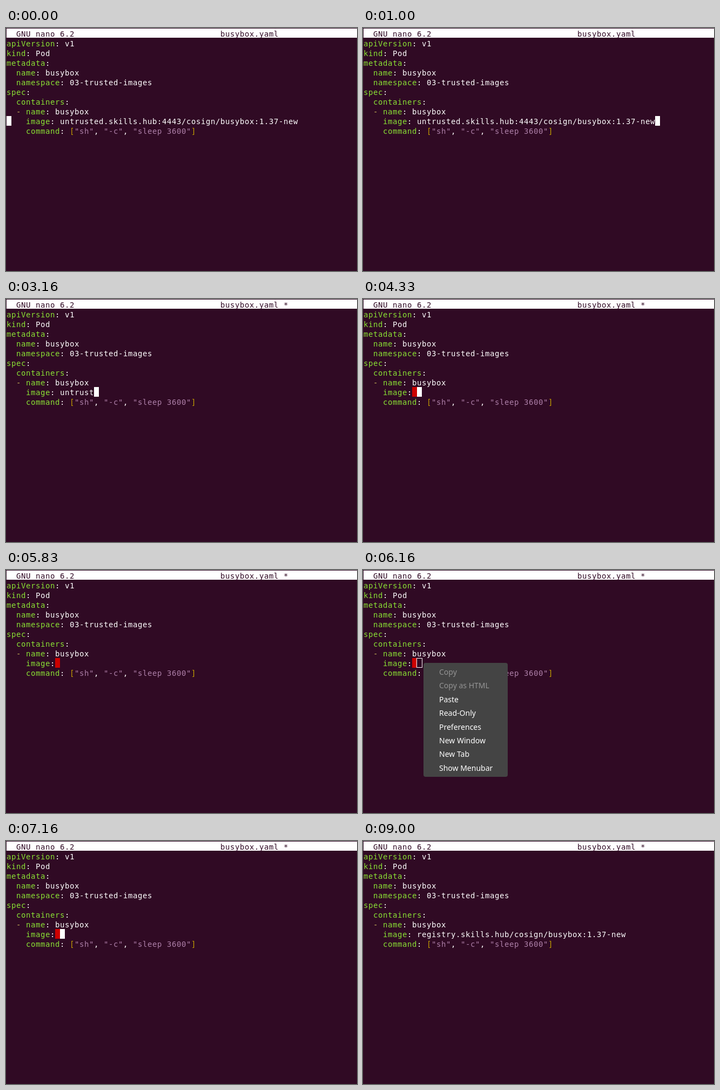
Recreate the animation shown at these times as an HTML page. Size 650 by 450 pixels, loop 9160 ms.

```html
<!DOCTYPE html>
<html lang="en">
<head>
<meta charset="utf-8">
<title>Editing a pod manifest</title>
<style>
  html, body { margin: 0; width: 100%; height: 100%; overflow: hidden; background: #300a24; }
  svg { display: block; width: 650px; height: 450px; }
  text { white-space: pre; }
  .term { font: 14px "DejaVu Sans Mono", monospace; letter-spacing: 0.572px; }
  .menu { font: 14px "Noto Sans", "Open Sans", sans-serif; }
</style>
</head>
<body>
<svg id="stage" viewBox="0 0 650 450"></svg>
<script>
const LOOP = 9160, STEP = 1000 / 6;
const CELL = 9, ROW = 18, IMAGE_ROW = 9, VALUE_COL = 11;
const BG = "#300a24", WHITE = "#ffffff", GREEN = "#8ae234",
      GOLD = "#c4a000", SAND = "#c8b458", PLUM = "#ad7fa8", RED = "#cc0000";
const OLD_IMAGE = "untrusted.skills.hub:4443/cosign/busybox:1.37-new";
const NEW_IMAGE = "registry.skills.hub/cosign/busybox:1.37-new";

const stage = document.getElementById("stage");
const colX = col => 1 + col * CELL;
const rowY = row => 1 + row * ROW;

function add(parent, tag, attrs, content) {
  const el = document.createElementNS("http://www.w3.org/2000/svg", tag);
  for (const name in attrs) el.setAttribute(name, attrs[name]);
  if (content) el.textContent = content;
  return parent.appendChild(el);
}

function write(row, col, content, fill) {
  return add(stage, "text", { class: "term", x: colX(col), y: rowY(row) + 15, fill }, content);
}

function writeKey(row, col, key, value) {
  write(row, col, key, GREEN);
  write(row, col + key.length, ":", WHITE);
  return write(row, col + key.length + 2, value, WHITE);
}

const show = (el, on) => el.setAttribute("visibility", on ? "visible" : "hidden");

add(stage, "rect", { width: 650, height: 450, fill: BG });
add(stage, "rect", { x: 1, y: 1, width: 649, height: ROW - 1, fill: WHITE });
write(0, 2, "GNU nano 6.2", BG);
const title = write(0, 44, "", BG);

writeKey(1, 0, "apiVersion", "v1");
writeKey(2, 0, "kind", "Pod");
writeKey(3, 0, "metadata", "");
writeKey(4, 2, "name", "busybox");
writeKey(5, 2, "namespace", "03-trusted-images");
writeKey(6, 0, "spec", "");
writeKey(7, 2, "containers", "");
write(8, 2, "-", SAND);
writeKey(8, 4, "name", "busybox");
const value = writeKey(IMAGE_ROW, 4, "image", "");
writeKey(10, 4, "command", "");

let col = 13;
for (const [part, fill] of [["[", GOLD], ['"sh"', PLUM], [", ", WHITE], ['"-c"', PLUM],
                            [", ", WHITE], ['"sleep 3600"', PLUM], ["]", GOLD]]) {
  write(10, col, part, fill);
  col += part.length;
}

const cellBox = { y: rowY(IMAGE_ROW), width: CELL, height: ROW };
const trailing = add(stage, "rect", { ...cellBox, x: colX(VALUE_COL - 1), fill: RED });
const cursor = add(stage, "rect", { ...cellBox, fill: WHITE });
const outline = add(stage, "rect", {
  x: colX(VALUE_COL) - 0.5, y: rowY(IMAGE_ROW) + 0.5, width: CELL + 1, height: ROW - 1,
  fill: "none", stroke: WHITE
});

const menu = add(stage, "g", { class: "menu" });
add(menu, "rect", { x: 112, y: 172, width: 156, height: 211, rx: 4, fill: "#444444" });
["Copy", "Copy as HTML", "Paste", "Read-Only", "Preferences",
 "New Window", "New Tab", "Show Menubar"].forEach((label, i) => {
  add(menu, "text", { x: 141, y: 194 + i * 25.4, fill: i < 2 ? "#949494" : WHITE }, label);
});

const within = (k, from, to) => k >= from && k < to;

// Characters left of the old value while Backspace is held; -1 also drops the space.
function charsLeft(k) {
  if (k < 8) return OLD_IMAGE.length;
  if (k < 11) return OLD_IMAGE.length - 1;
  if (k < 12) return OLD_IMAGE.length - 2;
  return k < 24 ? Math.max(-1, 42 - 5 * (k - 12)) : 0;
}

function render(time) {
  const k = Math.floor((time % LOOP + 7) / STEP);
  const left = charsLeft(k);
  const pasted = k >= 44;
  const content = pasted ? NEW_IMAGE : OLD_IMAGE.slice(0, Math.max(0, left));
  const menuOpen = within(k, 37, 43);
  const blinkOff = within(k, 28, 31) || within(k, 35, 37) || within(k, 47, 50) || k >= 54;

  title.textContent = "busybox.yaml" + (k >= 8 ? " *" : "");
  value.textContent = content;
  show(trailing, !pasted && left === 0);
  cursor.setAttribute("x", colX(k < 4 ? 0 : VALUE_COL + (pasted ? content.length : left)));
  show(cursor, !menuOpen && !blinkOff);
  show(outline, menuOpen);
  show(menu, menuOpen);
}

const start = performance.now();
function tick() {
  render(performance.now() - start);
  requestAnimationFrame(tick);
}
tick();
</script>
</body>
</html>
```
